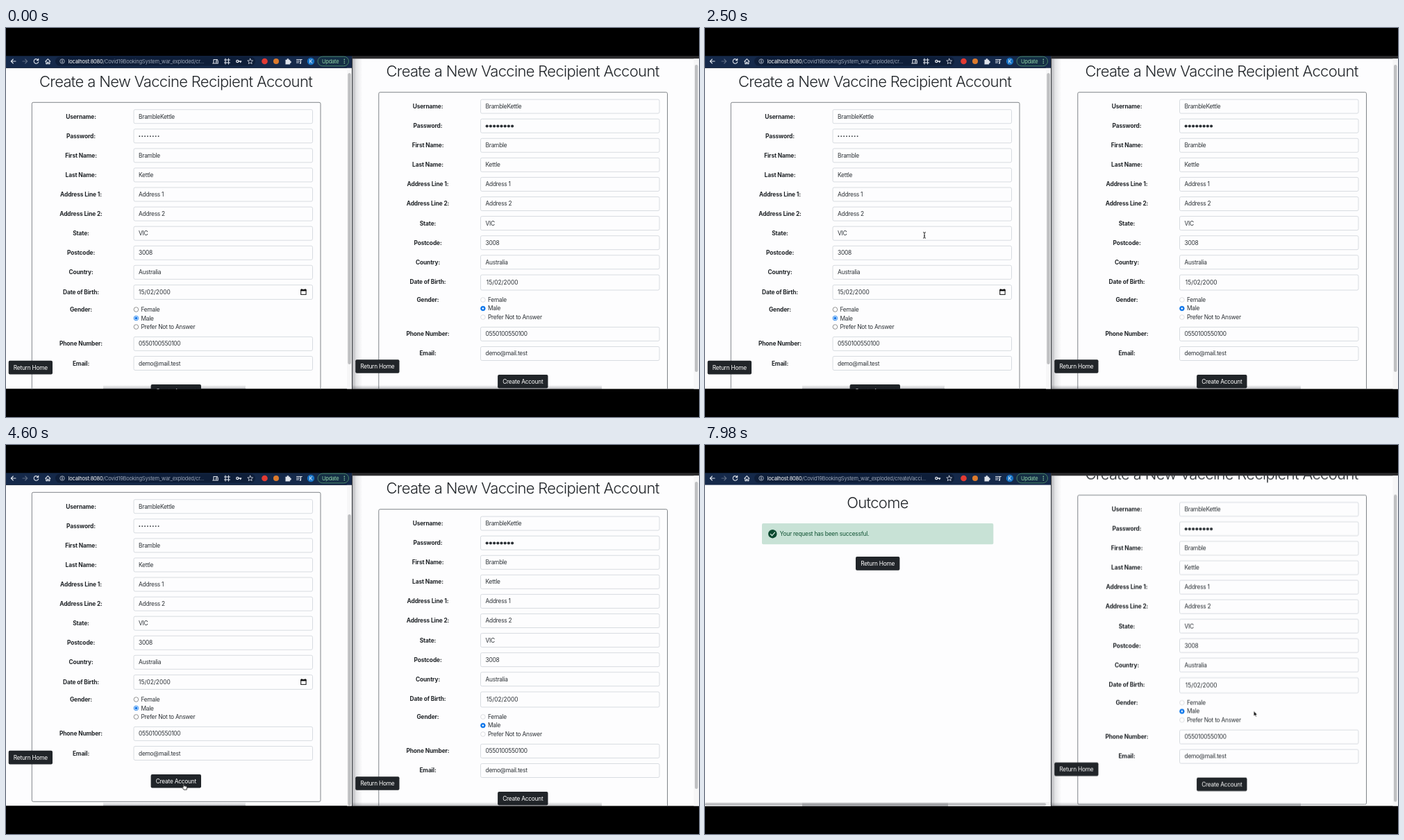
An HTML page that plays this animation: 998 px wide and 561 px high, repeating every 8000 ms.

```html
<!DOCTYPE html>
<html lang="en">
<head>
<meta charset="utf-8">
<title>Account form</title>
<style>
html, body { margin: 0; width: 100%; height: 100%; overflow: hidden; background: #000; }
svg { display: block; font-family: Inter, "Liberation Sans", sans-serif; font-optical-sizing: none; }
text { font-size: 8.4px; letter-spacing: -.03em; fill: #2b3035; }
.label { font-weight: 700; letter-spacing: -.015em; text-anchor: middle; fill: #212529; }
.title { font-size: 22px; font-weight: 300; text-anchor: middle; fill: #212529; }
.button { text-anchor: middle; fill: #fff; }
.date { letter-spacing: 0; }
.url { font-size: 7.5px; fill: #98a3b5; }
.url tspan { fill: #fff; }
.line { fill: none; stroke: #dfe4ec; stroke-width: 1.1; stroke-linecap: round; stroke-linejoin: round; }
</style>
</head>
<body>
<svg id="stage" width="998" height="561" viewBox="0 0 998 561"></svg>
<script>
const LOOP = 8000;
const stage = document.getElementById('stage');

function add(parent, tag, attrs = {}, content) {
  const el = document.createElementNS('http://www.w3.org/2000/svg', tag);
  for (const key in attrs) el.setAttribute(key, attrs[key]);
  if (content) el.textContent = content;
  return parent.appendChild(el);
}
const rect = (p, x, y, width, height, fill, more) => add(p, 'rect', { x, y, width, height, fill, ...more });
const circle = (p, cx, cy, r, fill, more) => add(p, 'circle', { cx, cy, r, fill, ...more });
const text = (p, x, y, value, cls = '') => add(p, 'text', { x, y: y + 3, class: cls }, value);
const line = (p, d, more) => add(p, 'path', { d, class: 'line', ...more });

// steps: [ms, value, easing until the next step]
function animate(el, prop, steps) {
  const frames = steps.map(([ms, value, easing = 'linear']) => ({ offset: ms / LOOP, [prop]: value, easing }));
  frames.push({ offset: 1, [prop]: steps.at(-1)[1] });
  el.animate(frames, { duration: LOOP, iterations: Infinity });
}
function show(el, from, to) {
  const steps = [[0, from ? 0 : 1, 'step-end']];
  if (from) steps.push([from, 1, 'step-end']);
  if (to < LOOP) steps.push([to, 0, 'step-end']);
  animate(el, 'opacity', steps);
}
const shift = (x, y) => `translate(${x}px, ${y}px)`;

function gradient(id, x2, y2, stops) {
  const g = add(stage, 'linearGradient', { id, x1: 0, y1: 0, x2, y2 });
  stops.forEach(([offset, opacity]) => add(g, 'stop', { offset, 'stop-color': '#10131c', 'stop-opacity': opacity }));
}
gradient('edge', 1, 0, [[0, .3], [.4, .1], [1, 0]]);
gradient('floor', 0, 1, [[0, 0], [1, .3]]);

function pane(x, y, width, height) {
  const p = add(stage, 'svg', { x, y, width, height, viewBox: `${x} ${y} ${width} ${height}` });
  rect(p, x, y, width, height, '#fdfdfe');
  return p;
}

function button(p, x, y, width, label) {
  rect(p, x, y, width, 19.6, '#212529', { rx: 2 });
  text(p, x + width / 2, y + 9.8, label, 'button');
}

function field(p, y, height = 20) {
  rect(p, 184, y - height / 2, 257.5, height, '#fdfdfe', { rx: 2, stroke: '#ced4da', 'stroke-width': .8 });
}

function form(p, native) {
  const g = add(p, 'g');
  const late = native ? 0 : .6;
  text(g, 244.5, 81.5, 'Create a New Vaccine Recipient Account', 'title');
  rect(g, 37.3, 107.3, 415.7, 446, 'none', { rx: 2, stroke: '#72767b', 'stroke-width': .9 });
  const rows = [
    ['Username', 'BrambleKettle'], ['Password'], ['First Name', 'Bramble'], ['Last Name', 'Kettle'],
    ['Address Line 1', 'Address 1'], ['Address Line 2', 'Address 2'],
    ['State', 'VIC'], ['Postcode', '3008'], ['Country', 'Australia']
  ];
  rows.forEach(([name, value], i) => {
    const y = 127.7 + i * 28.08;
    text(g, 108, y, name + ':', 'label');
    field(g, y);
    if (value) return text(g, 191, y, value);
    for (let k = 0; k < 8; k++)
      circle(g, (native ? 192.3 : 193.2) + k * (native ? 3.9 : 5.2), y + .3, native ? .95 : 2.1, '#2b3035');
  });

  text(g, 108, 380.6, 'Date of Birth:', 'label');
  field(g, 381 + late, native ? 20.8 : 22);
  text(g, native ? 191 : 192.3, 381 + late, '15/02/2000', 'date');
  if (native) {
    rect(g, 424.7, 377.6, 7.4, 6.8, 'none', { stroke: '#111' });
    rect(g, 424.4, 377, 8, 2.4, '#111');
    rect(g, 425.4, 376, 1.2, 2, '#111');
    rect(g, 430.2, 376, 1.2, 2, '#111');
  }

  text(g, 108, 406 + late, 'Gender:', 'label');
  ['Female', 'Male', 'Prefer Not to Answer'].forEach((name, i) => {
    const y = 406 + late + i * 12.5;
    const on = i === 1;
    const blue = '#0b75ea';
    circle(g, 187.4, y, 3.3, on && !native ? blue : '#fff',
      { stroke: on ? blue : native ? '#767676' : '#d3d5d9', 'stroke-width': .8 });
    if (on) circle(g, 187.4, y, native ? 2 : 1.3, native ? blue : '#fff');
    text(g, 194.5, y, name);
  });

  [['Phone Number', '0550100550100'], ['Email', 'demo@mail.test']].forEach(([name, value], i) => {
    const y = 455.4 + late + i * 28.1;
    text(g, 108, y, name + ':', 'label');
    field(g, y);
    text(g, 191, y, value);
  });
  button(g, 208.6, 514 + late, 72.4, 'Create Account');
  button(g, 3.7, 479.8 - (native ? 0 : -13), 63.3, 'Return Home');
  return g;
}

// Left window: form page
const left = pane(0, 57.5, 498, 463);
const formPage = add(left, 'g');
const leftForm = form(formPage, true);
rect(formPage, 491, 57, 7, 464, '#f7f7f8');
const leftThumb = rect(formPage, 492.3, 65, 4.6, 420, '#bfc0c2', { rx: 2.3 });
rect(formPage, 140, 515, 205, 6, 'url(#floor)');

// Left window: outcome page
const outcome = add(left, 'g');
rect(outcome, 0, 57, 498, 464, '#fdfdfe');
text(outcome, 248.5, 87.7, 'Outcome', 'title');
rect(outcome, 82, 113, 333.3, 30.3, '#c8e2d6', { rx: 2 });
circle(outcome, 97.3, 128.2, 6.2, '#0b4a30');
line(outcome, 'M94.4 128.4l2.2 2.3 3.9-4.6', { style: 'stroke:#d1e7dd;stroke-width:1.3' });
text(outcome, 107.8, 128.2, 'Your request has been successful.').style.fill = '#0f5132';
button(outcome, 217, 161.1, 63.4, 'Return Home');
rect(outcome, 0, 515, 498, 6, '#f2f2f3');
rect(outcome, 0, 516.2, 491, 4, '#bfc0c2', { rx: 2 });
rect(outcome, 140, 515, 210, 6, 'url(#floor)');

// Browser bar
rect(stage, 0, 40.3, 498, 17.3, '#15294a');
rect(stage, 71, 41.6, 288, 13, '#0e1e39', { rx: 6.5 });
line(stage, 'M14 48H7.5M10.3 45l-3 3 3 3');
line(stage, 'M24 48h6.5M27.7 45l3 3-3 3', { opacity: .35 });
line(stage, 'M46.3 46.2a3.3 3.3 0 1 0 .4 2.6M46.7 44.3v2.3h-2.3');
line(stage, 'M56.8 48.2l3.5-3.5 3.5 3.5M57.8 47.6v4h1.8v-2.3h1.5v2.3h1.8v-4');
circle(stage, 81, 48, 3.2, 'none', { stroke: '#c4ccd8', 'stroke-width': .8 });
line(stage, 'M81 47.8v1.6M81 46.3v.1', { 'stroke-width': .8 });

function address(path) {
  const g = add(stage, 'g');
  const t = text(g, 89.7, 47.8, '', 'url');
  add(t, 'tspan', {}, 'localhost:8080');
  t.append(path);
  return g;
}
const formUrl = address('/Covid19BookingSystem_war_exploded/cr...');
line(formUrl, 'M299 50.5v-5h5.5M297.7 51h4M302.7 47h2.5v4h-2.5z', { 'stroke-width': .9 });
line(formUrl, 'M316 44v8M320.5 44v8M314.5 46h8M314.5 50h8', { 'stroke-width': .9 });
const outcomeUrl = address('/Covid19BookingSystem_war_exploded/createVacci...');

circle(stage, 333.3, 48, 1.6, 'none', { stroke: '#dfe4ec', 'stroke-width': 1.3 });
line(stage, 'M335 48h3.7M337.7 48v1.5', { style: 'stroke-width:1.4' });
line(stage, 'M351.7 44.2l1.1 2.6 2.8.2-2.1 1.9.6 2.7-2.4-1.5-2.4 1.5.6-2.7-2.1-1.9 2.8-.2z', { style: 'stroke-width:.8' });
circle(stage, 372.5, 48, 4.3, '#e33a32');
circle(stage, 389, 48, 4, '#dc7a2c');
line(stage, 'M402.8 46h2a1.2 1.2 0 1 1 2.2 0h1.9v2a1.2 1.2 0 1 1 0 2.2v2h-6.1z', { style: 'fill:#dfe4ec;stroke-width:.4' });
line(stage, 'M418.5 45.5h6M418.5 47.8h4.5M418.5 50h3M424.5 50.5v-5h1.8');
circle(stage, 424, 50.7, 1.1, '#dfe4ec');
circle(stage, 439, 48, 5.2, '#1672c4');
text(stage, 439, 47.6, 'K', 'button').style.fontSize = '7.5px';
rect(stage, 449, 41.2, 44.5, 13.6, '#152f45', { rx: 6.8, stroke: '#4c8d6a', 'stroke-width': .9 });
text(stage, 455, 47.7, 'Update').style.cssText = 'font-size:7.5px;fill:#91d5a8';
for (let i = -1; i < 2; i++) circle(stage, 487.3, 48 + i * 2.6, .8, '#91d5a8');

// Right window
rect(stage, 499, 40.3, 499, 4.5, '#2c2c2e');
const right = pane(499, 44.3, 499, 476.2);
const rightForm = form(add(right, 'g', { transform: 'translate(499.5 -14.6)' }), false);
rightForm.lastChild.previousSibling.previousSibling;
rect(right, 499, 44, 14, 477, 'url(#edge)');
rect(right, 499, 515, 359, 6, 'url(#floor)');
rect(right, 990.5, 44, 7.5, 477, '#f6f6f7');
const rightThumb = rect(right, 992, 53, 4.4, 443, '#bfc0c2', { rx: 2.2 });
rect(stage, 498, 40.3, 1, 480.2, '#33363b');

// Pointers, each drawn with its hot spot at 0,0
const pointer = add(stage, 'g');
const beam = add(pointer, 'path', {
  d: 'M-2-4.2Q0-4.2 0-3Q0-4.2 2-4.2M0-3V3M-2 4.2Q0 4.2 0 3Q0 4.2 2 4.2M-1 .9H1',
  fill: 'none', stroke: '#222'
});
const arrow = add(pointer, 'path', {
  d: 'M0-3.5V4L1.7 2.5 2.9 5.1 4.1 4.5 3 2H5z', fill: '#111', stroke: '#fff', 'stroke-width': .6
});
const hand = add(pointer, 'path', {
  d: 'M-1.8-4q1-.5 1.2.5v2.3l3.3.6q1.2.3 1 1.7l-.5 3.2H-1L-3.2 1.2q.1-1.2 1.4-.3z',
  fill: '#fff', stroke: '#222', 'stroke-width': .9
});

// Timeline
const LOADED = 5240;
show(formPage, 0, LOADED);
show(formUrl, 0, LOADED);
show(outcome, LOADED, LOOP);
show(outcomeUrl, LOADED, LOOP);
const scroll = (el, from, to, distance) => animate(el, 'transform', [
  [0, shift(0, 0)], [from, shift(0, 0), 'ease-in-out'], [to, shift(0, distance)]
]);
scroll(leftForm, 2800, 3240, -39);
scroll(leftThumb, 2800, 3240, 35);
scroll(rightForm, 7600, 7960, -20.4);
scroll(rightThumb, 7600, 7960, 18.5);

show(pointer, 600, LOOP);
show(beam, 0, 3800);
animate(arrow, 'opacity', [
  [0, 0, 'step-end'], [3800, 1, 'step-end'], [4300, 0, 'step-end'], [5800, 1, 'step-end']
]);
animate(hand, 'opacity', [[0, 0, 'step-end'], [4300, 1, 'step-end'], [5800, 0, 'step-end']]);
animate(pointer, 'transform', [
  [0, shift(315.5, 299.3)], [1100, shift(315.5, 299.3)], [1700, shift(316, 298.8)],
  [3700, shift(316, 298.8), 'ease-in-out'], [4400, shift(257, 492.7)],
  [5700, shift(257, 492.7), 'ease-in-out'], [6700, shift(741, 401.5)],
  [7050, shift(741, 401.5), 'ease-in-out'], [7600, shift(790.3, 387)]
]);
</script>
</body>
</html>
```
